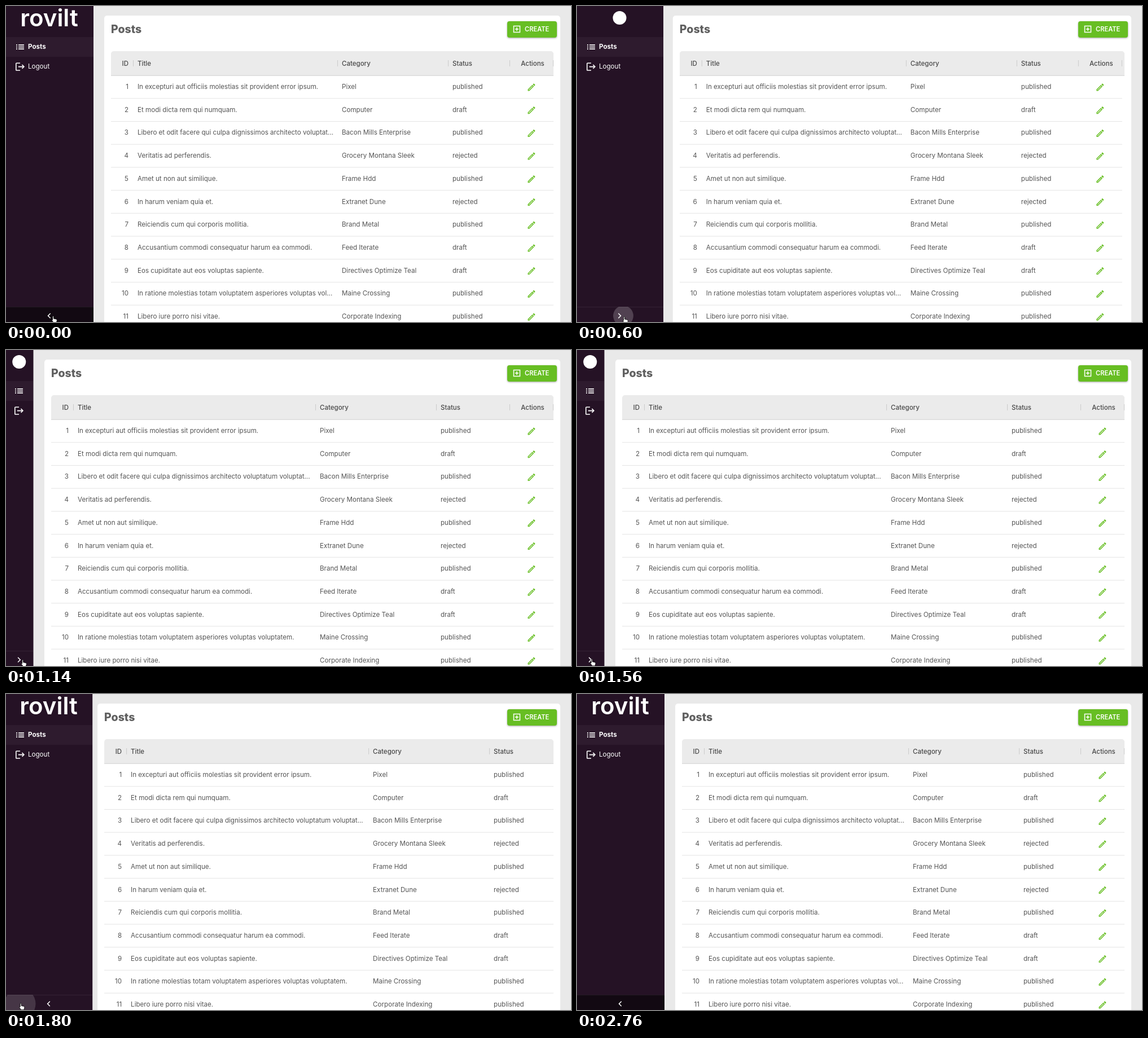
Animation, 1001 px wide and 560 px high, one loop 2.82 s. Source, as an HTML page:

```html
<!DOCTYPE html>
<html lang="en">
<head>
<meta charset="utf-8">
<title>Posts</title>
<style>
  html, body { margin: 0; width: 100%; height: 100%; overflow: hidden; background: #e9e9e9; }
  #stage { display: block; width: 1001px; height: 560px; font: 11.6px Inter, "Open Sans", sans-serif; }
  .cell { fill: #555; }
  .head { fill: #484848; font-size: 11.5px; font-weight: 500; }
  .title { fill: #5f5f5f; font-size: 19.5px; font-weight: 800; }
  .button { fill: #67be23; filter: drop-shadow(0 1px 1.5px rgba(0, 0, 0, .35)); }
  .brand { font-size: 42px; font-weight: 600; }
  .white { fill: #fff; }
  .line { fill: none; stroke: #fff; stroke-width: 1.5; }
</style>
</head>
<body>
<svg id="stage" viewBox="0 0 1001 560">
  <defs>
    <path id="pencil" fill="#67be23" transform="scale(.72) translate(-12 -12)"
      d="M14.06 9.02l.92.92L5.92 19H5v-.92l9.06-9.06M17.66 3c-.25 0-.51.1-.7.29l-1.83 1.83 3.75 3.75 1.83-1.83c.39-.39.39-1.02 0-1.41l-2.34-2.34c-.2-.2-.45-.29-.71-.29zm-3.6 3.19L3 17.25V21h3.75L17.81 9.94l-3.75-3.75z"/>
  </defs>

  <rect width="1001" height="560" fill="#e9e9e9"/>
  <rect id="panel" y="17" height="560" rx="5" fill="#fff"/>
  <text id="heading" class="title" y="48">Posts</text>
  <rect class="button" x="888" y="27" width="88" height="29" rx="4"/>
  <path class="line" stroke-width="1.3" d="M899.5 35.5h11v11h-11zM905 38v6M902 41h6"/>
  <text class="white" x="919" y="45" font-size="11.1" font-weight="600">CREATE</text>

  <svg id="table" height="560">
    <rect id="headBar" y="80" height="50" rx="5" fill="#ebebeb"/>
    <rect y="123" width="100%" height="437" fill="#fff"/>
    <rect y="122.8" width="100%" height="1" fill="#d2d2d2"/>
    <g id="narrowGrid"></g>
    <g id="wideGrid"></g>
  </svg>

  <svg id="sidebar" height="560">
    <rect width="160" height="560" fill="#251225"/>
    <rect y="55" width="160" height="35" fill="#fff" opacity=".04"/>
    <text id="wordmark" class="white brand" y="36" text-anchor="middle">rovilt</text>
    <circle id="badge" class="white" cy="21" r="12"/>
    <g id="icons" class="white">
      <path d="M18 68.2h2v1.7h-2zm4 0h10v1.7H22zM18 71.7h2v1.7h-2zm4 0h10v1.7H22zM18 75.2h2v1.7h-2zm4 0h10v1.7H22z"/>
      <path transform="translate(15.4 98) scale(.8)"
        d="M17 7l-1.41 1.41L18.17 11H8v2h10.17l-2.58 2.58L17 17l5-5zM4 5h8V3H4c-1.1 0-2 .9-2 2v14c0 1.1.9 2 2 2h8v-2H4V5z"/>
    </g>
    <svg id="labels" class="white" x="39" height="560">
      <text y="76" font-weight="700">Posts</text>
      <text y="111">Logout</text>
    </svg>
    <svg y="533" width="160" height="27">
      <rect id="barShade" width="160" height="27"/>
      <rect width="160" height="1" fill="#fff" opacity=".07"/>
      <circle id="ripple" class="white" cy="16"/>
      <path id="chevron" class="line" stroke-width="1.8" d="M2.2 -4.2L-2 0L2.2 4.2"/>
    </svg>
  </svg>

  <path id="hand" fill="#fff" stroke="#000" stroke-width=".8"
    d="M1.6 1q1.2-1 2 0v4l4.4 .9q1.8 .5 1.3 2.8l-1.2 3.5H3.4L.2 8q-.2-1.5 1.4-.8z"/>
</svg>

<script>
const LOOP = 2820, STEP = 60;
const $ = id => document.getElementById(id);
const set = (id, attrs) => {
  for (const name in attrs) $(id).setAttribute(name, attrs[name]);
};
const show = (id, visible) => set(id, { display: visible ? "inline" : "none" });

// Title (short form after "|" is used in the narrow grid), category, status
const rows = [
  ["In excepturi aut officiis molestias sit provident error ipsum.", "Pixel", "published"],
  ["Et modi dicta rem qui numquam.", "Computer", "draft"],
  ["Libero et odit facere qui culpa dignissimos architecto voluptatum voluptat...|Libero et odit facere qui culpa dignissimos architecto voluptat...", "Bacon Mills Enterprise", "published"],
  ["Veritatis ad perferendis.", "Grocery Montana Sleek", "rejected"],
  ["Amet ut non aut similique.", "Frame Hdd", "published"],
  ["In harum veniam quia et.", "Extranet Dune", "rejected"],
  ["Reiciendis cum qui corporis mollitia.", "Brand Metal", "published"],
  ["Accusantium commodi consequatur harum ea commodi.", "Feed Iterate", "draft"],
  ["Eos cupiditate aut eos voluptas sapiente.", "Directives Optimize Teal", "draft"],
  ["In ratione molestias totam voluptatem asperiores voluptas voluptatem.|In ratione molestias totam voluptatem asperiores voluptas vol...", "Maine Crossing", "published"],
  ["Libero iure porro nisi vitae.", "Corporate Indexing", "published"]
];

function buildGrid(width, category, status, actions, narrow) {
  const text = (kind, x, y, value, anchor = "start") =>
    `<text class="${kind}" x="${x}" y="${y}" text-anchor="${anchor}">${value}</text>`;
  const line = (kind, x, y, id, ...values) =>
    text(kind, 31, y, id, "end") + [47, category, status].map((left, i) => text(kind, left, y, values[i])).join("");

  const head = line("head", 0, 105.5, "ID", "Title", "Category", "Status")
    + text("head", actions, 105.5, "Actions", "middle")
    + [39, category - 8, status - 8, actions - 41, width - 1]
        .map(x => `<rect x="${x}" y="96" width="1" height="11" fill="#cbcbcb"/>`).join("");

  const body = rows.map(([title, group, state], i) => {
    const top = 123 + i * 40.7;
    const [long, short = long] = title.split("|");
    return line("cell", 0, top + 24, i + 1, narrow ? short : long, group, state)
      + `<use href="#pencil" x="${actions - 2}" y="${top + 21}"/>`
      + `<rect y="${top + 40.3}" width="${width}" height="1" fill="#e4e4e4"/>`;
  });
  return head + body.join("");
}
$("narrowGrid").innerHTML = buildGrid(784, 409, 605, 747, true);
$("wideGrid").innerHTML = buildGrid(890, 476, 690, 853, false);

const clamp = x => Math.min(1, Math.max(0, x));
const ease = x => (x = clamp(x)) < .5 ? 2 * x * x : 1 - 2 * (1 - x) ** 2;
const ramp = (t, start, duration) => ease((t - start) / duration);

// Eased value through [time, value] points
function track(t, points) {
  let value = points[0][1];
  for (let i = 1; i < points.length; i++) {
    const [t0, v0] = points[i - 1], [t1, v1] = points[i];
    value += (v1 - v0) * ramp(t, t0, t1 - t0);
  }
  return value;
}

function drawRipple(t) {
  const first = t < 1400;
  const [x, radius, press, release] = first ? [82, 84, 440, 600] : [25, 31, 1480, 1680];
  set("ripple", {
    cx: x,
    r: radius * ramp(t, press, 550 - (first ? 60 : 130)),
    opacity: t < press ? 0 : .2 * (1 - clamp((t - release) / 520))
  });
}

function draw(t) {
  const width = 155 - 106.5 * (ramp(t, 584, 164) - ramp(t, 1651, 164));
  const left = 186 - 106 * (ramp(t, 568, 228) - ramp(t, 1626, 228));
  const collapsed = t >= 590 && t < 1640;
  const wide = t >= 860 && t < 1914;
  const middle = width / 2 - 1;

  set("panel", { x: left - 12, width: 994 - left });
  set("heading", { x: left });
  set("table", { x: left, width: 970 - left });
  set("headBar", { width: 970 - left });
  show("narrowGrid", !wide);
  show("wideGrid", wide);

  set("sidebar", { width });
  set("wordmark", { x: middle });
  set("badge", { cx: middle });
  show("wordmark", !collapsed);
  show("badge", collapsed);
  set("icons", { transform: `translate(${width < 52 ? -2 : 0} 0)` });
  set("labels", { width: Math.max(0, width - 52) });
  set("chevron", { transform: `translate(${middle} 16) scale(${collapsed ? -1 : 1} 1)` });
  set("barShade", {
    opacity: .5 * track(t, [[0, 1], [220, 0], [700, 0], [850, 1], [950, 1], [1100, 0], [2220, 0], [2400, 1]])
  });
  drawRipple(t);

  const x = track(t, [[720, 81], [1040, 27], [1300, 27], [1600, 23.5], [2000, 23.5], [2160, 25]]);
  const y = track(t, [[0, 549], [500, 550], [720, 550], [1040, 548.5], [1300, 548.5], [1600, 547.5], [2040, 547.5], [2280, 562]]);
  set("hand", { transform: `translate(${x} ${y})` });
  show("hand", t < 2400);
}

const start = performance.now();
function tick() {
  const elapsed = (performance.now() - start) % LOOP;
  draw(Math.floor(elapsed / STEP) * STEP);
  requestAnimationFrame(tick);
}
tick();
</script>
</body>
</html>
```
